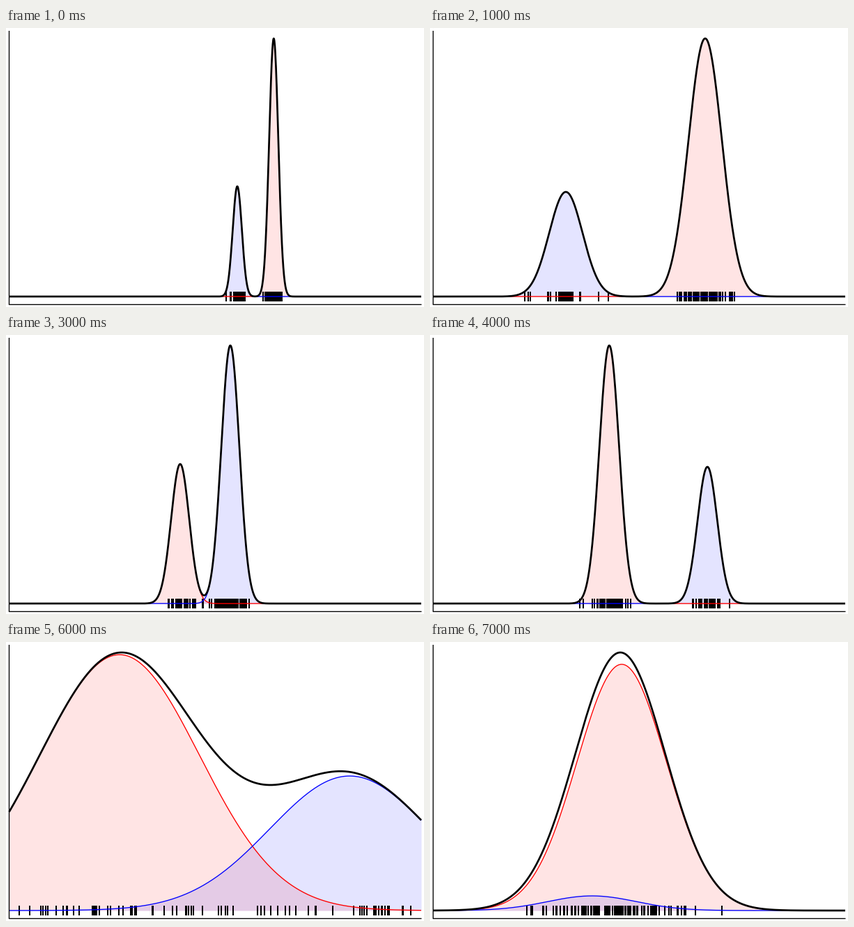
Animation of 600x400 px, one loop 8000 ms. Source, as a matplotlib script:

```python
import numpy as np
import matplotlib.pyplot as plt
from matplotlib.animation import FuncAnimation

W, H, DPI = 600, 400, 100
LEFT, RIGHT, BOTTOM = 4.5, 596, 396.5
BASE, PEAK = 385, 370
SAMPLES = 90
PX = 72 / DPI

# red centre, red height, blue centre, blue height, shared sigma
MIXTURES = [
    (384.3, 370, 332, 158, 6.6),
    (395, 370, 195, 150, 24),
    (313.5, 370, 236, 72, 12.3),
    (250, 200, 322, 370, 13),
    (257.3, 370, 398.2, 196, 14.2),
    (126, 17.5, 324.3, 370, 70),
    (163, 367, 493.3, 193, 114.8),
    (275.2, 353, 232.6, 21, 64),
]

x = np.linspace(LEFT, RIGHT, 1800)

fig = plt.figure(figsize=(W / DPI, H / DPI), dpi=DPI, facecolor="white")
ax = fig.add_axes([0, 0, 1, 1])


def bell(centre, height, sigma):
    return height * np.exp(-((x - centre) / sigma) ** 2 / 2)


def line(xs, ys, color, width):
    ax.plot(xs, ys, color=color, lw=width * PX, solid_capstyle="butt",
            snap=False)


def sample(m1, h1, m2, h2, sigma, seed):
    """Points drawn from the mixture, on whole pixels inside the plot."""
    rng = np.random.default_rng(seed)
    centre = np.where(rng.random(SAMPLES) < h1 / (h1 + h2), m1, m2)
    points = np.round(rng.normal(centre, sigma))
    return points[(points > LEFT + 1) & (points < RIGHT - 1)]


def draw(i):
    ax.clear()
    ax.set(xlim=(0, W), ylim=(H, 0))
    ax.axis("off")

    m1, h1, m2, h2, sigma = MIXTURES[i]
    red, blue = bell(m1, h1, sigma), bell(m2, h2, sigma)
    scale = PEAK / (red + blue).max()
    for part, color in ((red, "#ff0000"), (blue, "#0000ff")):
        y = BASE - scale * part
        ax.fill_between(x, BASE, y, color=color, alpha=0.105, lw=0)
        line(x, y, color, 1.35)
    line(x, BASE - scale * (red + blue), "black", 2.7)

    marks = [(p - 1, 2) for p in sample(*MIXTURES[i], seed=i)]
    ax.broken_barh(marks, (378, 14), color="black", lw=0)
    line([LEFT, LEFT], [4, BOTTOM + 0.5], "black", 1.35)
    line([LEFT - 0.5, RIGHT + 0.5], [BOTTOM, BOTTOM], "black", 1.35)
    return []


anim = FuncAnimation(fig, draw, frames=len(MIXTURES), init_func=lambda: [],
                     interval=1000, repeat=True)
plt.show()
```
